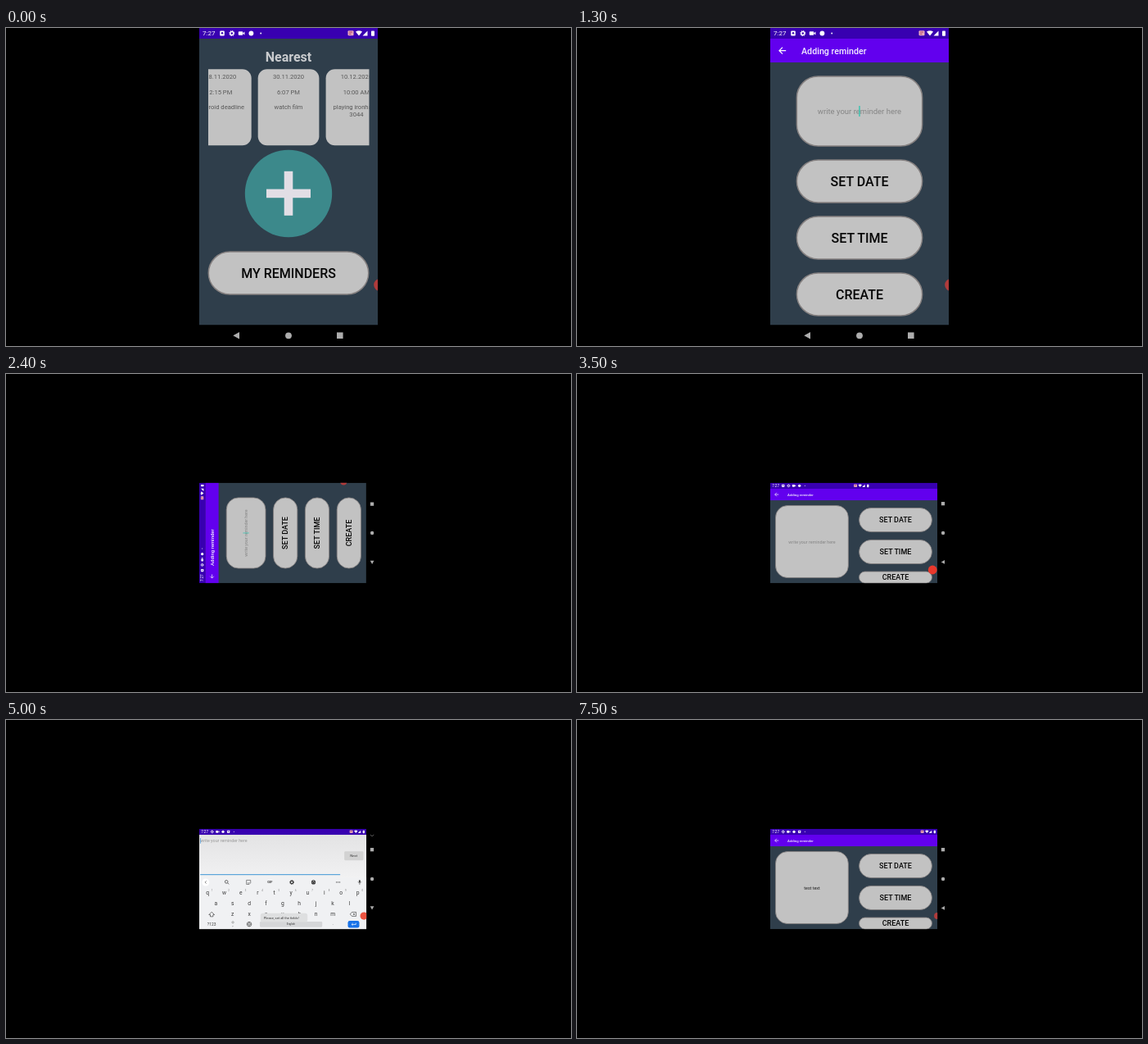
Animation, 690 px wide and 388 px high, one loop 8 s. Source, as an HTML page:

```html
<!DOCTYPE html>
<html lang="en">
<head>
<meta charset="utf-8">
<title>Reminder app</title>
<style>
  html, body { margin: 0; width: 100%; height: 100%; overflow: hidden; background: #000; }
  svg { display: block; width: 100%; height: 100%; }
  text { font-family: Roboto, "Open Sans", sans-serif; white-space: pre; }
</style>
</head>
<body>
<svg id="stage" viewBox="0 0 690 388"></svg>
<script>
const LOOP = 8000;
const PORTRAIT = 'translate(236 0)';
const TURNED = 'matrix(0 -.5625 .5625 0 236 255.3)';
const LANDSCAPE = 'translate(236 132.7) scale(.5625)';
const INDIGO = '#3800b0', VIOLET = '#6200ee', SLATE = '#2f3e4b', GREY = '#c2c2c2', INK = '#3c3c3c';
const HINT = 'write your reminder here';

// Shape helpers
const rect = (x, y, w, h, fill, r = 0, more = '') =>
  `<rect x="${x}" y="${y}" width="${w}" height="${h}" rx="${r}" fill="${fill}" ${more}/>`;
const disc = (x, y, r, fill, more = '') => `<circle cx="${x}" cy="${y}" r="${r}" fill="${fill}" ${more}/>`;
const line = (d, color, w = 1) =>
  `<path d="${d}" fill="none" stroke="${color}" stroke-width="${w}"/>`;
const solid = (d, fill) => `<path d="${d}" fill="${fill}"/>`;
const text = (x, y, size, str, fill, weight = 400, anchor = 'middle') =>
  `<text x="${x}" y="${y}" font-size="${size}" fill="${fill}" font-weight="${weight}" text-anchor="${anchor}">${str}</text>`;
const group = (id, body, more = '') => `<g id="${id}" ${more}>${body}</g>`;
const pill = (x, y, w, h, label = '') =>
  rect(x, y, w, h, GREY, Math.min(26, h / 2), 'stroke="#858080" stroke-width="1.5"') +
  text(x + w / 2, y + h / 2 + 5.8, 16, label, '#050505', 500);
const gear = (x, y, r, color) =>
  disc(x, y, r * .68, 'none', `stroke="${color}" stroke-width="${r * .5}"`) +
  disc(x, y, r, 'none', `stroke="${color}" stroke-width="${r * .4}" stroke-dasharray="${r * .4} ${r * .385}"`);

// Status bar
const leftIcons = {
  badge: x => rect(x - 2.8, 3.6, 5.6, 5.8, '#fff', 1) + disc(x, 6.2, 1.2, INDIGO),
  gear: x => gear(x, 6.5, 2.9, '#fff'),
  video: x => rect(x - 3.8, 4.2, 5.4, 4.6, '#fff', .8) + solid(`M${x + 1.4} 6.5l2.4 -2v4z`, '#fff'),
  app: x => disc(x, 6.5, 2.9, '#fff'),
  dot: x => disc(x, 6.5, .9, '#fff')
};
const leftRow = names => names.map((n, i) => leftIcons[n](28 + i * 11.8)).join('');
const EARLY = leftRow(['badge', 'gear', 'video', 'app', 'dot']);
const LATE = leftRow(['gear', 'video', 'app', 'badge', 'dot']);
const CLOCK = text(4, 9.3, 8, '7:27', '#fff', 400, 'start');
const RIGHT = rect(181.5, 3.3, 7, 6, '#e7a9bd', 1) + line('M183 5h4M183 7.3h2.5', '#a03058', .9) +
  solid('M191 4.6q4 -2.8 8 0l-4 5z', '#fff') + solid('M199.5 9.5l6 -6v6z', '#fff') +
  rect(210, 3.6, 4, 6.2, '#fff', .7);

// Navigation buttons
const LEFT_ARROW = 'M41.3 375.3l7.7 -4.2v8.4z';
const NAV_COLOR = '#adadad';

const backArrow = (x, y) => line(`M${x + 4.2} ${y}h-8M${x} ${y - 4}l-4 4l4 4`, '#fff', 1.2);

function home() {
  const card = (x, lines) => rect(x, 50.3, 74.7, 93, GREY, 11) +
    lines.map((s, i) => text(x + 37.3, [62.3, 80.8, 99.3, 107.6][i], 7.6, s, '#585858')).join('');
  const cards = card(-11, ['28.11.2020', '2:15 PM']) +
    text(55, 99.3, 7.6, 'asteroid deadline', '#585858', 400, 'end') +
    card(71.7, ['30.11.2020', '6:07 PM', 'watch film']) +
    card(154.6, ['10.12.2020', '10:00 AM', 'playing ironhazel', '3044']);
  return rect(0, 13, 218, 349.5, SLATE) + text(109, 40.5, 16, 'Nearest', '#c9cbce', 700) +
    `<g clip-path="url(#cardsClip)">${cards}</g>` +
    disc(109, 202, 53.2, '#3c898b') +
    rect(82, 196.6, 54, 10.6, '#e2dee5') + rect(103.7, 174.8, 10.6, 54, '#e2dee5') +
    pill(11.3, 273, 195.4, 52, 'MY REMINDERS');
}

function addTall() {
  return rect(0, 13, 218, 349.5, SLATE) + rect(0, 13, 218, 29, VIOLET) + backArrow(15, 27.7) +
    text(38, 31.6, 10.7, 'Adding reminder', '#f3edff', 500, 'start') +
    pill(32.4, 59, 153.2, 85) + text(109, 105, 9.5, HINT, '#858585') +
    rect(108.3, 95, 1.4, 13, '#35c4b0', 0, 'id="tallCaret"') +
    ['SET DATE', 'SET TIME', 'CREATE'].map((s, i) => pill(32.4, 161 + i * 69, 153.2, 52, s)).join('');
}

function addWide() {
  return rect(0, 13, 363, 205, SLATE) + rect(0, 13, 363, 25, VIOLET) + backArrow(14, 25.5) +
    text(37.5, 28.2, 7.6, 'Adding reminder', '#f3edff', 500, 'start') +
    pill(11.5, 49.5, 158, 156.5) +
    group('wideHint', text(90.7, 131.6, 9.5, HINT, '#858585')) +
    group('wideText', text(90.7, 131.6, 9.5, 'test text', '#1c1c1c')) +
    rect(108.3, 121.5, 1.3, 13, '#35c4b0', 0, 'id="wideCaret"') +
    pill(193, 54.8, 158, 51.7, 'SET DATE') + pill(193, 124, 158, 51.7, 'SET TIME') +
    pill(193, 192.7, 158, 25, 'CREATE');
}

function keyboard() {
  const keys = (letters, x, y, fromKey = 0) => [...letters].map((c, i) =>
    c === ' ' ? '' : text(x + (i + fromKey) * 36.25, y, 12, c, INK)).join('');
  const digits = [...'1234567890'].map((c, i) => text(28 + i * 36.25, 136, 5, c, '#777')).join('');
  const toolbar = line('M15.5 113l-3 3l3 3', INK) +
    disc(59, 115, 3.2, 'none', `stroke="${INK}" stroke-width="1.3"`) + line('M61.3 117.3l3 3', INK, 1.4) +
    line('M102.5 111.5h9v6l-3 3h-6zM104.5 117l2 1.5l3 -2', INK) + text(153.5, 118.5, 7, 'GIF', INK, 700) +
    gear(201, 116, 4.4, INK) + disc(248, 116, 4.7, INK) +
    [[-2.3, 0], [0, -2.4], [2.3, 0]].map(([x, y]) => disc(248 + x, 116 + y, .9, '#eee')).join('') +
    [-3.5, 0, 3.5].map(d => disc(301.5 + d, 116, 1.1, INK)).join('');
  const words = line('M12.5 113l3 3l-3 3', INK) +
    [['test', 76.5], ['testedited', 180.5], ['testing', 284.5]].map(([s, x]) => text(x, 119, 9.5, s, '#555')).join('');
  return rect(0, 13, 363, 205, 'url(#paper)') + rect(0, 105, 363, 113, '#f0f1f3') +
    rect(2, 98.5, 304, 1.9, '#4c9ed8') + rect(315, 49, 41.5, 19.5, '#d2d2d2', 2) +
    text(335.5, 61.2, 7.6, 'Next', '#333') +
    group('typed', '') + rect(0, 20, 1.3, 12, '#3f8fd0', 0, 'id="keyCaret"') +
    disc(14, 116, 8, '#fff') + group('toolbar', toolbar) + group('words', words) +
    rect(346.5, 111, 3.4, 6, INK, 1.7) + line('M344.5 115q3.7 6 7.4 0M348.2 118.5v3', INK) +
    keys('qwertyuiop', 18, 143) + digits + keys('asdfghjkl', 36, 165.5) + keys('zxcvbnm', 72.5, 189.2) +
    line('M27 180.5l6 6h-3v4h-6v-4h-3z', INK, 1.2) +
    line('M327.5 185.3l4 -4.5h9v9h-9zM333.8 183.2l4.2 4.2m0 -4.2l-4.2 4.2', INK, 1.1) +
    text(27, 210.3, 8.8, '?123', INK) + text(73, 212, 9, ',', INK) +
    disc(73, 203, 2.1, 'none', 'stroke="#666" stroke-width=".9"') +
    disc(108.5, 207, 5, 'none', `stroke="${INK}" stroke-width="1.1"`) +
    line('M103.5 207h10M108.5 202q-5 5 0 10q5 -5 0 -10', INK, .9) +
    rect(131.5, 201.5, 135.5, 11.8, '#d5d6d8', 2) + text(199, 209.3, 5.6, 'English', '#333') +
    text(290, 209, 9, '.', INK) + rect(322.7, 199.6, 24.8, 15, '#1a73e8', 4) +
    line('M340 204.5v3h-9M333.5 205l-2.7 2.5l2.7 2.5', '#fff', 1.3);
}

const wideNav = rect(371.3, 41.5, 7.6, 7.6, NAV_COLOR) + disc(375.2, 108.9, 3.9, NAV_COLOR) +
  group('navBack', solid('M371 172l7.7 -4.2v8.4z', NAV_COLOR)) +
  group('navHide', solid('M371 168h8.4l-4.2 7.8z', NAV_COLOR) + line('M371.5 12.8l3.7 3.6l3.7 -3.6', '#777', 1.4));

document.getElementById('stage').innerHTML = `<defs>
  <clipPath id="cardsClip"><rect x="11" y="50" width="196.5" height="94"/></clipPath>
  <clipPath id="tallClip"><rect width="218" height="362.5"/></clipPath>
  <clipPath id="wideClip"><rect width="363" height="218"/></clipPath>
  <linearGradient id="paper" x2="0" y2="1"><stop stop-color="#e3e3e4"/><stop offset=".45" stop-color="#f1f1f2"/></linearGradient>
</defs>` + rect(0, 0, 690, 388, '#000') +
  group('tall',
    `<g clip-path="url(#tallClip)">` + group('home', home()) + group('addTall', addTall()) +
    rect(0, 0, 218, 13, INDIGO) + CLOCK + EARLY + RIGHT + disc(220.5, 313.5, 7.3, '#b03b3b') + '</g>' +
    solid(LEFT_ARROW, NAV_COLOR) + disc(109, 375.3, 3.9, NAV_COLOR) + rect(168, 371.4, 7.6, 7.6, NAV_COLOR)) +
  group('wide',
    `<g clip-path="url(#wideClip)">` + group('addWide', addWide()) + group('keyboard', keyboard()) +
    rect(0, 0, 363, 13, INDIGO) + CLOCK + group('early', EARLY) + group('late', LATE) + group('right', RIGHT) +
    group('toast', rect(133, 183.3, 102, 19, '#dedfe0', 5) +
      text(140, 195.3, 7.2, 'Please, set all the fields!', '#333', 400, 'start')) +
    disc(0, 189, 9, '#e8382c', 'id="dot"') + '</g>' + wideNav, `transform="${LANDSCAPE}"`);

// Each step changes some values and keeps the rest.
const steps = [
  [0, { view: 'tall', turn: PORTRAIT, open: 0, tallCaret: 0, caret: 0, late: 0, shift: 0, toast: 0,
        keys: 0, hide: 0, typed: '', dot: [352.4, 9.6, '#e8382c'] }],
  [100, { open: .2 }], [200, { open: .55 }], [300, { open: .85 }], [400, { open: 1 }],
  [1000, { tallCaret: 1 }],
  [1400, { turn: TURNED }],
  [3500, { view: 'wide' }],
  [3600, { shift: 145, late: 1 }],
  [3800, { dot: [355, 8.8, '#ea4536'] }],
  [3900, { dot: [357.5, 8.2, '#ec5340'] }],
  [4100, { toast: .4 }], [4200, { toast: .8 }], [4300, { toast: 1 }],
  [4700, { hide: 1 }],
  [5000, { keys: 1 }],
  [6300, { typed: 't' }], [6400, { typed: 'te' }], [6500, { typed: 'tes' }],
  [6600, { typed: 'test', dot: [363, 7.3, '#b03b3b'] }],
  [6700, { typed: 'test t' }], [6800, { typed: 'test te' }], [6900, { typed: 'test text' }],
  [7000, { hide: 0 }],
  [7100, { keys: 0, toast: 0, caret: 1 }],
  [7400, { caret: 0 }]
];

const el = id => document.getElementById(id);
const show = (id, on) => { el(id).style.display = on ? '' : 'none'; };

function apply(s) {
  show('tall', s.view === 'tall');
  show('wide', s.view === 'wide');
  el('tall').setAttribute('transform', s.turn);
  const scale = .9 + .1 * s.open;
  el('addTall').setAttribute('opacity', s.open);
  el('addTall').setAttribute('transform', `translate(109 188) scale(${scale}) translate(-109 -188)`);
  show('home', s.open < 1);
  show('tallCaret', s.tallCaret);
  show('wideCaret', s.caret);
  show('early', !s.late);
  show('late', s.late);
  el('right').setAttribute('transform', `translate(${s.shift} 0)`);
  el('toast').setAttribute('opacity', s.toast);
  show('addWide', !s.keys);
  show('keyboard', s.keys);
  show('wideHint', !s.typed);
  show('wideText', s.typed);
  show('toolbar', !s.typed);
  show('words', s.typed);
  show('navBack', !s.hide);
  show('navHide', s.hide);
  ['cx', 'r', 'fill'].forEach((name, i) => el('dot').setAttribute(name, s.dot[i]));

  const cut = s.typed.lastIndexOf(' ') + 1;
  const content = s.typed
    ? s.typed.slice(0, cut) + `<tspan text-decoration="underline">${s.typed.slice(cut)}</tspan>` : HINT;
  el('typed').innerHTML = text(2, 28.5, 9.5, content, s.typed ? '#333' : '#989898', 400, 'start');
  const end = s.typed && s.keys ? el('typed').firstChild.getComputedTextLength() : 0;
  el('keyCaret').setAttribute('x', 1.8 + end);
}

let current = -1;
function draw(now) {
  const t = now % LOOP;
  const index = steps.filter(([at]) => at <= t).length - 1;
  if (index !== current) {
    current = index;
    apply(Object.assign({}, ...steps.slice(0, index + 1).map(([, change]) => change)));
  }
}

const start = performance.now();
function tick() {
  draw(performance.now() - start);
  requestAnimationFrame(tick);
}
tick();
</script>
</body>
</html>
```
